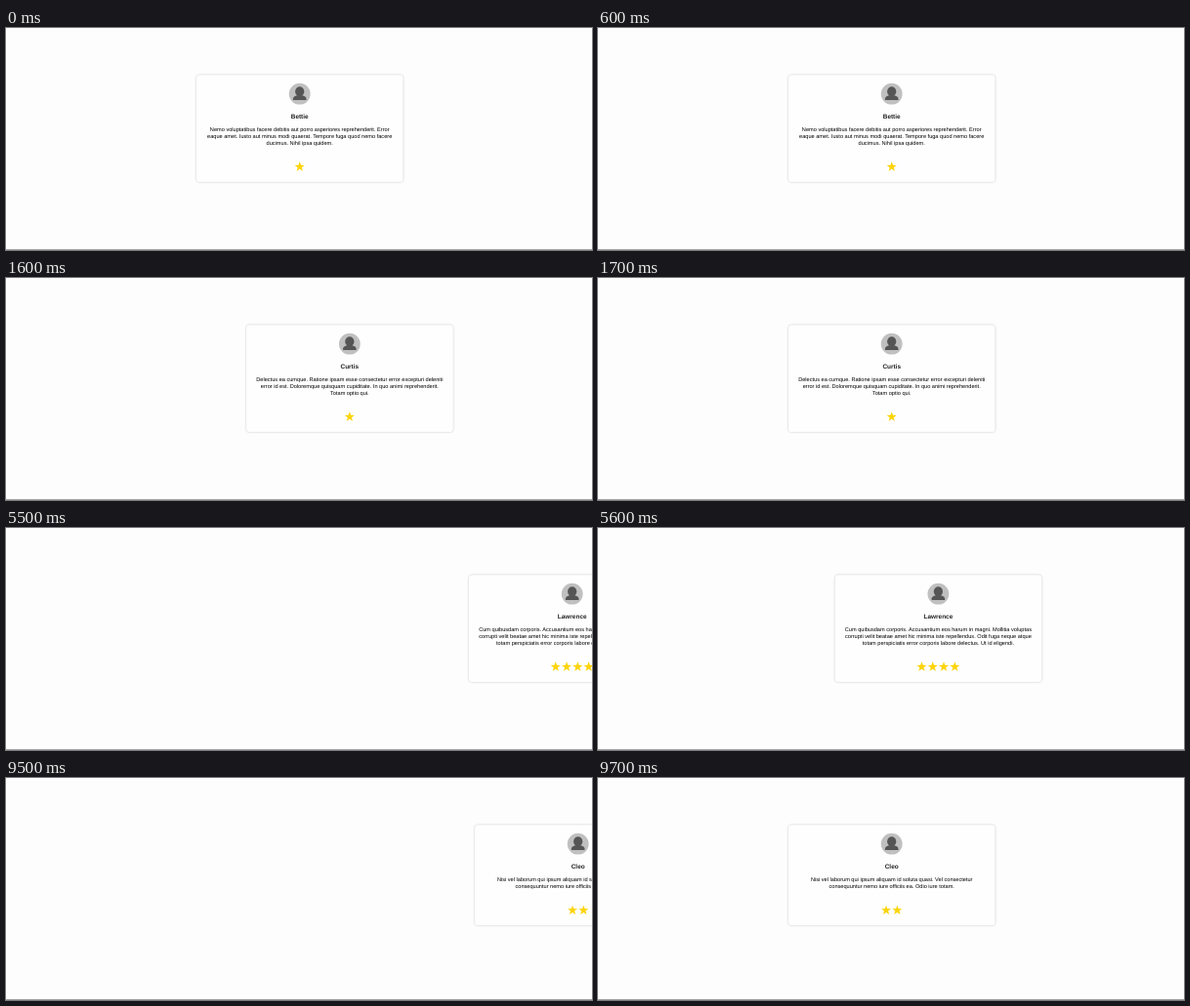
An HTML page that plays this animation: 600x228 px, repeating every 9800 ms.

```html
<!DOCTYPE html>
<html lang="en">
<head>
<meta charset="utf-8">
<title>Reviews</title>
<style>
  html, body { margin: 0; width: 100%; height: 100%; overflow: hidden; background: #fdfdfd; }
  svg { display: block; width: 100%; height: 100%; }
  text {
    font-family: "Liberation Sans", Arial, Helvetica, sans-serif;
    font-size: 5.62px;
    text-anchor: middle;
    text-rendering: geometricPrecision;
    fill: #000;
  }
  .name { font-size: 6.45px; font-weight: bold; fill: #222; }
  .panel { fill: #fefefe; filter: drop-shadow(0 .8px 1.1px rgba(0, 0, 0, .22)); }
</style>
</head>
<body>
<svg id="stage" viewBox="0 0 600 228">
  <rect y="227" width="600" height="1" fill="#a6a6a6"/>
</svg>
<script>
const LOOP = 9800;
const STEP = 100;   // the slide advances in held steps
const SLIDE = 300;  // length of one slide change
const GAP = 696;    // distance between neighbouring cards
const MID = 300.7;
const LINE = 6.65;

const reviews = [
  { name: "Bettie", stars: 1, lines: [
    "Nemo voluptatibus facere debitis aut porro asperiores reprehenderit. Error",
    "eaque amet. Iusto aut minus modi quaerat. Tempore fuga quod nemo facere",
    "ducimus. Nihil ipsa quidem."] },
  { name: "Curtis", stars: 1, lines: [
    "Delectus ea cumque. Ratione ipsam esse consectetur error excepturi deleniti",
    "error id est. Doloremque quisquam cupiditate. In quo animi reprehenderit.",
    "Totam optio qui."] },
  { name: "Lawrence", stars: 4, lines: [
    "Cum quibusdam corporis. Accusantium eos harum in magni. Mollitia voluptas",
    "corrupti velit beatae amet hic minima iste repellendus. Odit fuga neque atque",
    "totam perspiciatis error corporis labore delectus. Ut id eligendi."] },
  { name: "Cleo", stars: 2, lines: [
    "Nisi vel laborum qui ipsum aliquam id soluta quasi. Vel consectetur",
    "consequuntur nemo iure officiis ea. Odio iure totam."] }
];

// start: when the card first shows up; lead: how far into the slide that is
const changes = [
  { start: 1500, lead: 101 },
  { start: 5500, lead: 104 },
  { start: 9500, lead: 102.5 }
];

const stage = document.getElementById("stage");

function add(parent, tag, attrs, content) {
  const el = document.createElementNS("http://www.w3.org/2000/svg", tag);
  for (const key in attrs) el.setAttribute(key, attrs[key]);
  if (content) el.textContent = content;
  parent.appendChild(el);
  return el;
}

function starPath(cx, cy, r) {
  const points = [];
  for (let i = 0; i < 10; i++) {
    const a = i * Math.PI / 5 - Math.PI / 2;
    const d = i % 2 ? r * 0.41 : r;
    points.push((cx + d * Math.cos(a)).toFixed(2) + "," + (cy + d * Math.sin(a)).toFixed(2));
  }
  return points.join(" ");
}

function makeCard({ name, stars, lines }) {
  const card = add(stage, "g", {});
  const bottom = 158 - (3 - lines.length) * LINE;
  add(card, "rect", { class: "panel", x: 195, y: 48.3, width: 211.6, height: bottom - 48.3, rx: 3.6 });

  add(card, "circle", { cx: MID, cy: 67.7, r: 10.9, fill: "#c0c0c0" });
  add(card, "ellipse", { cx: MID, cy: 65.2, rx: 4.6, ry: 5, fill: "#555" });
  add(card, "path", {
    d: `M${MID - 6.8} 74v-1.2q0-2.6 4.6-3.8h4.4q4.6 1.2 4.6 3.8v1.2z`, fill: "#555"
  });

  add(card, "text", { class: "name", x: MID, y: 93 }, name);
  lines.forEach((line, i) => add(card, "text", { x: MID, y: 106.4 + i * LINE }, line));

  for (let i = 0; i < stars; i++) {
    const x = MID + (i - (stars - 1) / 2) * 11.3;
    add(card, "polygon", { points: starPath(x, bottom - 15.4, 5.3), fill: "#fcd40a" });
  }
  return card;
}

// cubic-bezier(.25, .1, .25, 1)
function ease(x) {
  if (x >= 1) return 1;
  let lo = 0, hi = 1, s = 0.5;
  for (let i = 0; i < 24; i++) {
    s = (lo + hi) / 2;
    if (0.75 * s * (1 - s) + s ** 3 < x) lo = s; else hi = s;
  }
  return 0.3 * s * (1 - s) ** 2 + 3 * (1 - s) * s * s + s ** 3;
}

function position(time) {
  let pos = 0;
  for (const { start, lead } of changes) {
    if (time < start) break;
    const held = Math.floor((time - start) / STEP) * STEP;
    pos += held >= 2 * STEP ? 1 : ease((held + lead) / SLIDE);
  }
  return pos;
}

const cards = reviews.map(makeCard);
const begin = performance.now();

function draw(now) {
  const pos = position(Math.max(0, now - begin) % LOOP);
  cards.forEach((card, i) => {
    const shift = (i - pos) * GAP;
    card.setAttribute("transform", `translate(${shift.toFixed(2)} 0)`);
    card.setAttribute("visibility", Math.abs(shift) < 420 ? "visible" : "hidden");
  });
  requestAnimationFrame(draw);
}
draw(begin);
</script>
</body>
</html>
```
